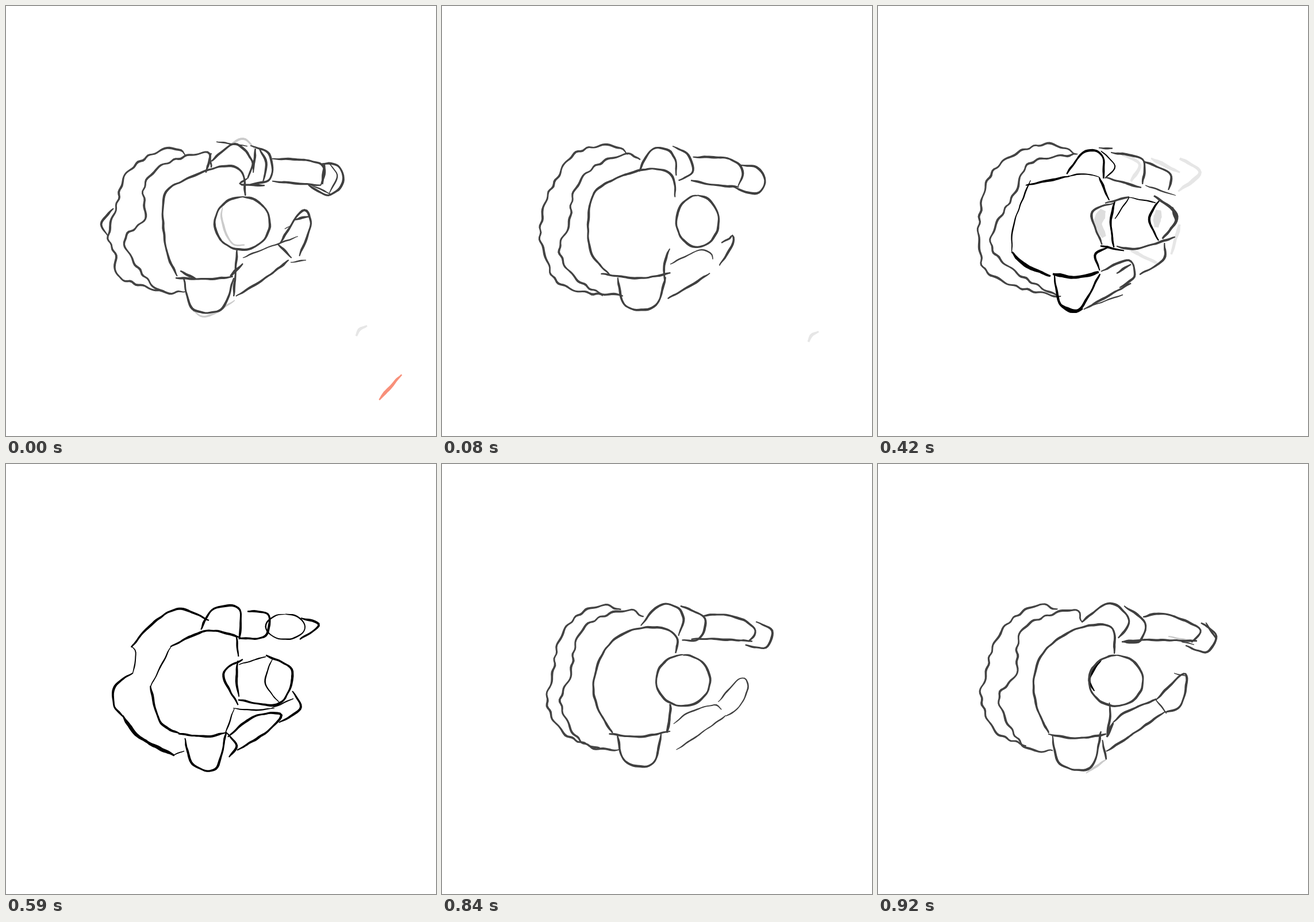
An HTML page that plays this animation: 748 px wide and 748 px high, repeating every 1 s.

```html
<!DOCTYPE html>
<html lang="en">
<head>
<meta charset="utf-8">
<title>Spinning figure sketch</title>
<style>
  html, body { margin: 0; width: 100%; height: 100%; overflow: hidden; background: #fff; }
  svg { display: block; width: 100%; height: 100%; overflow: hidden; }
  #strip { --step: 0; transform: translateX(calc(var(--step) * -748px)); animation: flip 1s step-end infinite; }
  @keyframes flip {
    0% { --step: 0; }
    8% { --step: 1; }
    25% { --step: 2; }
    42% { --step: 3; }
    59% { --step: 4; }
    76% { --step: 5; }
    84% { --step: 6; }
    92%, 100% { --step: 7; }
  }
</style>
</head>
<body>
<svg viewBox="0 0 748 748"><g id="strip"></g></svg>
<script>
const inks = {
  d: ['#404040', 3.7], t: ['#404040', 2.3], b: ['#404040', 5], w: ['#444', 3.5],
  k: ['#000', 3.7], j: ['#000', 2.2], K: ['#000', 5.5], m: ['#858585', 3.5],
  c: ['#cbcbcb', 3.5], g: ['#dedede', 15], l: ['#e6e6e6', 6], o: ['#f8907a', 5]
};

// Each stroke: ink letter, then a few points; "@" is an ellipse (centre, radii).
const wide = {
  cloak: 'w 313 259 290 247 250 260 208 294 193 345 178 400 190 432 193 468 222 482 272 497',
  cape: 'w 356 281 347 255 272 277 240 315 241 370 206 412 262 492 312 496',
  torso: 'd 416 330 410 288 375 279 310 303 275 332 278 420 298 470',
  belt: 'd 295 473 350 475 395 471',
  arm: 'd 357 270 398 240 428 270 420 300',
  elbow: 'd 425 243 458 258 460 300 425 310',
  fore: 'd 463 266 520 268 553 280 548 312',
  under: 'd 463 305 548 312',
  hand: 'd 550 274 578 278 586 308 560 329 526 311',
  head: 'd@ 411 378 48 46',
  side: 'd 402 424 396 505',
  arm2: 't 412 438 440 426 508 401',
  under2: 'd 400 505 450 474 492 442',
  hand2: 'd 477 412 515 356 530 380 510 435',
  cup: 'd 309 473 325 527 375 527 396 473'
};
const wideMarks = [
  'c 390 240 415 231 433 250', 'c 376 350 376 375 392 412 415 416', 'c 325 530 350 540 398 512',
  'l 628 556 615 563 609 574', 'o 688 641 649 685', 'd 187 352 166 378 177 400', 'd 357 256 348 290',
  't 366 236 420 244', 'd 434 248 430 290', 'd 440 247 453 275 446 308', 'd 420 300 408 310 450 312',
  'b 554 275 550 310', 't 560 272 576 295 562 326', 't 528 310 565 327', 'b 303 461 330 475',
  'b 390 470 412 448', 'd 473 414 497 438', 'd 500 372 527 366', 't 495 446 522 442', 't 485 388 497 381'
];

const left = {
  cloak: 'w 335 255 295 236 230 242 200 290 172 322 164 360 168 430 215 497 288 509',
  cape: 'w 332 256 270 270 228 315 200 402 222 480 318 510',
  torso: 'd 395 335 388 298 330 289 258 318 236 380 240 435 285 465',
  belt: 'd 258 458 335 472 400 458',
  arm: 'd 328 306 335 262 372 248 395 290',
  elbow: 'd 377 245 411 272 398 297',
  fore: 'd 410 260 470 262 492 290 483 315',
  under: 'd 403 301 440 314 485 317',
  hand: 'd 487 280 530 288 535 322 485 318',
  head: 'd@ 478 371 26 44',
  side: 'b 390 420 375 435 378 462',
  arm2: 'd 382 460 440 430 453 455 435 480',
  under2: 'd 385 513 440 487',
  hand2: 'd 495 412 500 435 455 468',
  cup: 'd 302 472 315 518 365 518 382 470'
};
const leftMarks = [
  'l 300 293 255 325 258 420 300 462', 'l 420 255 437 280 428 305', 'g 510 380 514 428', 'l 460 340 440 370 455 410',
  'm 300 250 220 277 203 325 176 372', 'c 250 300 222 370 210 440 222 475', 'b 253 318 237 405',
  'b 229 427 258 458', 'd 383 243 410 285', 'b 490 280 494 316', 'd 390 342 425 331 478 330',
  'd 382 338 392 350 380 358 394 378 384 400 390 420', 'd 384 420 440 427 495 405', 'b 465 335 488 358 490 385',
  'b 470 333 494 366', 'b 503 350 508 378 490 405', 't 402 425 388 500', 't 408 432 400 490', 'd 318 536 380 513',
  't 303 462 322 462'
];

const frontBody = [
  'w 347 258 295 240 230 262 190 305 175 385 178 425 187 460 240 488 318 506',
  'w 345 258 265 273 238 325 196 408 233 458 310 504',
  'j 233 430 236 380 265 303', 'k 257 312 333 296', 'j 330 296 360 292 385 298', 'k 385 298 402 338',
  'K 233 428 255 450 300 470', 'K 304 466 345 472 384 463', 'k 386 460 378 432 400 420',
  'k 306 466 318 520 350 528 386 466', 'K 318 520 340 531 356 526'
];
const frontLimbs = [
  'k 328 292 360 253 390 260 392 300', 'j 388 252 412 278 395 300', 'd 384 247 408 248',
  'd 405 255 460 267 460 310', 'd 395 298 458 316', 'd 462 270 508 292 505 320', 't 465 312 518 330',
  'd 388 462 435 442 446 470 420 490', 'd 498 412 496 442 455 467', 'd 358 528 440 482', 't 370 522 426 502',
  'd 415 465 440 449'
];
const frontHead = [
  'd 410 343 372 360 390 415', 'k 412 340 405 375 410 420', 'k 387 417 428 426', 'd 395 343 437 332',
  'j 437 333 412 370', 'j 437 333 483 342', 'k 490 337 472 370 488 408', 'b 480 330 520 365 495 405',
  'b 512 350 518 373', 'd 415 418 450 422 517 402'
];
const frontWash = [
  'l 425 258 455 275 440 305', 'l 525 265 560 290 522 322', 'l 475 265 525 290', 'l 525 380 510 432',
  'g 392 355 383 378 393 402', 'g 488 355 484 385', 'l 440 425 490 450'
];

const cleanBody = [
  'k 353 272 300 252 252 280 218 319', 'j 219 318 226 330 221 363', 'k 221 363 190 386 188 420 205 440',
  'K 203 438 232 475 293 507', 'j 290 507 310 499', 'j 287 317 251 388', 'k 251 386 268 448 304 470',
  'k 300 469 350 474 382 467', 'k 286 318 350 290 408 302', 'k 401 300 404 335',
  'k 311 477 325 522 365 530 383 466'
];
const cleanLimbs = [
  'k 339 288 360 253 405 251 406 305', 'k 420 256 456 262 450 300 405 303', 'j@ 486 283 34 22',
  'k 513 268 545 280 511 305', 'j 397 425 382 468', 'j 395 425 430 428 467 425',
  'k 386 475 430 440 478 435 455 465 402 498', 'k 384 468 401 490 388 510', 'k 498 395 512 425 475 450',
  'j 462 425 500 408'
];
const cleanHead = [
  'k 412 340 378 365 404 419', 'k 403 342 401 375 405 405', 'k 404 410 475 417 498 360 452 333',
  'j 405 349 452 335', 'j 464 337 451 380 475 415'
];

const right = {
  cloak: 'w 310 255 280 247 235 260 202 305 197 365 187 428 222 474 290 500',
  cape: 'w 345 258 285 258 230 297 202 395 210 445 240 487 312 495',
  torso: 'd 401 328 405 303 340 287 285 308 257 380 265 425 296 468',
  belt: 'd 285 468 340 472 397 459',
  arm: 'd 338 288 358 250 398 248 405 295',
  elbow: 'd 402 246 450 262 440 300 410 304',
  fore: 'd 448 262 510 268 530 295 520 307',
  under: 'd 443 300 525 308',
  hand: 'd 530 273 560 282 555 311 520 314',
  head: 'd@ 425 376 47 45',
  side: 'b 392 420 385 460',
  arm2: 't 397 455 430 432 480 422 488 445',
  under2: 't 418 495 488 445',
  hand2: 't 478 417 510 378 527 400 488 445',
  cup: 'd 308 472 320 513 362 516 375 470'
};
const rightMarks = [
  'g 403 348 396 375 403 402', 'g 455 350 452 400', 'g 420 410 445 408', 'c 425 335 440 375 430 418',
  'c 412 342 432 415', 'o 186 429 189 433', 'w 325 257 270 280 246 306', 'd 255 308 246 330 244 340',
  'd 270 412 296 465', 'b 400 247 405 302', 'd 338 287 405 303', 't 448 256 486 261', 'd 395 335 378 375 396 415',
  'd 400 340 430 328 458 345', 'b 452 326 473 380 455 412', 'd 395 459 410 480 385 515', 't 398 500 421 478',
  't 312 475 348 522', 't 330 517 365 527', 't 404 444 470 418'
];

const back = {
  cloak: 'w 312 254 277 245 228 275 200 318 187 370 179 405 203 464 258 490',
  cape: 'w 355 275 338 253 262 278 243 312 240 366 210 410 253 490 304 499',
  torso: 'd 411 330 405 283 345 287 290 325 271 375 277 425 297 468',
  belt: 'd 296 470 345 477 397 470',
  arm: 'd 354 275 403 242 437 272 418 303',
  elbow: 'd 428 247 464 275 455 308 425 309',
  fore: 'd 461 266 500 261 560 287 545 310',
  under: 'd 424 309 470 306 555 308',
  hand: 'd 562 276 588 298 572 327 535 316',
  head: 'd@ 414 377 47 44',
  side: 'd 402 415 404 435 398 475',
  arm2: 'd 409 450 430 432 485 409',
  under2: 'd 397 500 440 472 500 430',
  hand2: 'd 483 411 534 364 528 418 500 432',
  cup: 'd 303 472 317 522 370 528 388 465'
};
const backMarks = [
  'c 397 514 362 538', 'c 505 300 540 307', 'k 388 341 368 372 376 395', 'd 570 276 588 304', 't 482 408 502 434',
  'd 390 480 397 514', 'b 398 475 409 450', 't 515 364 536 369', 't 528 309 550 314'
];

const strip = document.getElementById('strip');
let seed = 7;
const rand = () => (seed = seed * 16807 % 2147483647) / 2147483647;
const mix = (a, b, t) => a + (b - a) * t;
const gap = (p, q) => Math.hypot(q[0] - p[0], q[1] - p[1]);

function parse(text) {
  const [code, ...n] = text.split(' ');
  if (code[1] === '@') return { ink: code[0], pts: ellipse(...n.map(Number)) };
  const pts = [];
  for (let i = 0; i < n.length; i += 2) pts.push([+n[i], +n[i + 1]]);
  return { ink: code[0], pts: spline(pts) };
}

function ellipse(x, y, rx, ry) {
  return Array.from({ length: 49 }, (_, i) => {
    const a = i / 24 * Math.PI;
    return [x + rx * Math.sin(a), y - ry * Math.cos(a)];
  });
}

// Catmull-Rom curve through the points
function spline(p) {
  const out = [], last = p.length - 1;
  for (let i = 0; i < last; i++) {
    const a = p[Math.max(i - 1, 0)], b = p[i], c = p[i + 1], d = p[Math.min(i + 2, last)];
    for (let t = 0; t < 1; t += 1 / 16) {
      out.push([0, 1].map(k => b[k] + t / 2 * (c[k] - a[k] +
        t * (2 * a[k] - 5 * b[k] + 4 * c[k] - d[k] + t * (3 * (b[k] - c[k]) + d[k] - a[k])))));
    }
  }
  return [...out, p[last]];
}

// Evenly spaced points along a line
function resample(p, count) {
  const len = [0];
  for (let i = 1; i < p.length; i++) len.push(len[i - 1] + gap(p[i - 1], p[i]));
  const total = len[len.length - 1];
  count = count || Math.max(3, Math.round(total / 4));
  const out = [];
  for (let j = 0, i = 1; j <= count; j++) {
    const s = total * j / count;
    while (i < p.length - 1 && len[i] < s) i++;
    const t = (s - len[i - 1]) / (len[i] - len[i - 1]);
    out.push([0, 1].map(k => mix(p[i - 1][k], p[i][k], t)));
  }
  return out;
}

const strokes = (...lists) => lists.flatMap(l => Object.values(l)).map(parse);

// Pose halfway between two others
function between(a, b) {
  return Object.keys(a).map(k => {
    const p = parse(a[k]), r = resample(parse(b[k]).pts, 90);
    return { ink: p.ink, pts: resample(p.pts, 90).map((u, i) => u.map((v, k) => mix(v, r[i][k], .5))) };
  });
}

// Outline of a brush line with uneven pressure and thin ends; cloth lines ripple
function brush({ ink, pts }) {
  const p = resample(pts), n = p.length - 1, phase = rand() * 6, a = [], b = [];
  const wave = ink === 'w' ? 1.5 : .4, width = inks[ink][1];
  p.forEach(([x, y], i) => {
    const u = p[Math.max(i - 1, 0)], v = p[Math.min(i + 1, n)], l = gap(u, v) || 1;
    const nx = (u[1] - v[1]) / l, ny = (v[0] - u[0]) / l;
    const taper = Math.min(1, .55 + Math.min(i, n - i) * .15);
    const h = width / 2 * taper * (1 + .16 * Math.sin(i * .4 + phase) + .12 * (rand() - .5));
    const off = wave * Math.sin(i * .9 + phase + Math.sin(i * .3));
    a.push([x + nx * (off + h), y + ny * (off + h)]);
    b.unshift([x + nx * (off - h), y + ny * (off - h)]);
  });
  return 'M' + [...a, ...b].map(q => q.map(k => k.toFixed(1)).join(' ')).join('L') + 'Z';
}

function add(parent, tag, attrs) {
  const el = document.createElementNS('http://www.w3.org/2000/svg', tag);
  for (const k in attrs) el.setAttribute(k, attrs[k]);
  return parent.appendChild(el);
}

[
  strokes(wideMarks, wide),
  [...between(wide, left), parse('l 655 566 643 573 637 584')],
  strokes(leftMarks, left),
  strokes(frontWash, frontBody, frontLimbs, frontHead),
  strokes(cleanBody, cleanLimbs, cleanHead),
  strokes(rightMarks, right),
  between(right, back),
  strokes(backMarks, back)
].forEach((list, i) => {
  const g = add(strip, 'g', { transform: `translate(${i * 748})` });
  list.forEach(s => add(g, 'path', { d: brush(s), fill: inks[s.ink][0] }));
});
</script>
</body>
</html>
```
